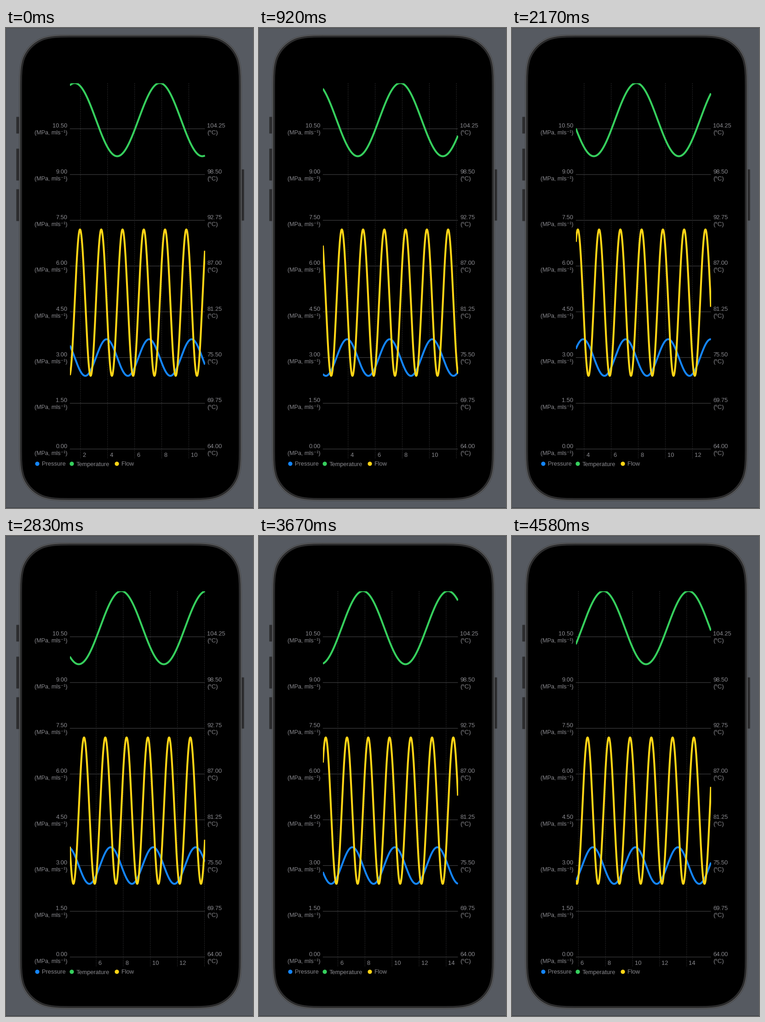
Write a matplotlib script that moves like this. It is 537 px wide and 1042 px high and loops after 4670 ms.

```python
import numpy as np
import matplotlib.pyplot as plt
from matplotlib.animation import FuncAnimation
from matplotlib.patches import Circle, PathPatch, Rectangle, FancyBboxPatch
from matplotlib.path import Path

W, H, DPI = 537, 1042, 64
PT = 72 / DPI                      # points per pixel
LOOP_MS = 4670
POSES, SUB = 56, 3                 # chart steps per loop, frames per step
FRAMES = POSES * SUB

# plot area in pixels
LEFT, RIGHT, TOP, BASE = 138.8, 432.5, 119.5, 914.0
PX_X, PX_Y = 29.43, 66.21          # pixels per unit
SPAN = (RIGHT - LEFT) / PX_X
START, STEP = 1.213, 0.0836        # first x shown, units per chart step

BLUE, GREEN, YELLOW = "#1485fb", "#36cf5d", "#ffd516"
LABEL = "#8b8b90"
FONT = ["Liberation Sans", "DejaVu Sans"]

# name, colour, middle, amplitude, frequency
SERIES = [
    ("Pressure", BLUE, 3.0, 0.6, 2),
    ("Temperature", GREEN, 10.8, 1.2, 1),
    ("Flow", YELLOW, 4.8, 2.4, 4),
]

fig = plt.figure(figsize=(W / DPI, H / DPI), dpi=DPI, facecolor="#565a61")
ax = fig.add_axes([0, 0, 1, 1])
ax.set_xlim(0, W)
ax.set_ylim(H, 0)
ax.axis("off")


def to_y(v):
    return BASE - PX_Y * v


def text(x, y, s, size=12.9, ha="left"):
    return ax.text(x, y, s, fontsize=size * PT, family=FONT, color=LABEL,
                   ha=ha, va="baseline", zorder=6)


def rect(x0, y0, x1, y1, color, z=1):
    ax.add_patch(Rectangle((x0, y0), x1 - x0, y1 - y0, fc=color, lw=0, zorder=z))


def smooth_rect(x0, y0, x1, y1, r, color, z):
    """Rounded rectangle whose corners ease into the sides."""
    corner = r * np.array([
        (0, 1.5287), (0, 1.0885), (0, 0.8684), (0.0749, 0.6315),
        (0.1691, 0.3728), (0.3728, 0.1691), (0.6315, 0.0749),
        (0.8684, 0), (1.0885, 0), (1.5287, 0)])
    flip = corner[::-1]
    parts = [
        corner + (x0, y0),
        flip * (-1, 1) + (x1, y0),
        corner * (-1, -1) + (x1, y1),
        flip * (1, -1) + (x0, y1),
    ]
    verts = np.vstack(parts + [parts[0][:1]])
    codes = ([Path.LINETO] + [Path.CURVE4] * 9) * 4 + [Path.CLOSEPOLY]
    codes[0] = Path.MOVETO
    ax.add_patch(PathPatch(Path(verts, codes), fc=color, lw=0, zorder=z))


def button(x0, y0, x1, y1):
    ax.add_patch(FancyBboxPatch(
        (x0 + 1, y0 + 1), x1 - x0 - 2, y1 - y0 - 2,
        boxstyle="round,pad=1,rounding_size=1", fc="#2c2c2e",
        ec="#3d3f42", lw=0.7 * PT, zorder=1))


def draw_phone():
    rect(0, 0, W, 1, "#4b4f55")
    rect(0, 0, 1, H, "#4f5359")
    rect(0, H - 1.5, W, H, "#3b3e42")
    for y0, y1 in [(193, 229), (262, 331), (350, 419)]:
        button(22.5, y0, 29, y1)
    button(511, 307, 517.5, 418)
    shells = [(0, "#3a3b3d"), (1, "#77787a"), (2, "#2b2b2c"), (6.5, "#000000")]
    for inset, color in shells:
        smooth_rect(28.3 + inset, 14 + inset, 512.7 - inset, 1027 - inset,
                    82 - inset, color, 2)


def draw_axes():
    for k in range(8):
        y = to_y(1.5 * k)
        ax.plot([LEFT, RIGHT], [y, y], color="#4b4b4d", lw=PT, snap=False,
                solid_capstyle="butt", zorder=3)
        text(133.5, y - 2.3, f"{1.5 * k:.2f}", ha="right")
        text(133.5, y + 12.6, "(MPa, mls⁻¹)", 12.6, ha="right")
        text(437, y - 2.3, f"{64 + 5.75 * k:.2f}")
        text(437, y + 12.6, "(°C)", 13.2)


def draw_legend():
    for (name, color, *_), x in zip(SERIES, [68, 143, 241]):
        ax.add_patch(Circle((x, 946), 4.6, fc=color, lw=0, zorder=6))
        text(x + 9.8, 950.5, name)


draw_phone()
draw_axes()
draw_legend()

ticks = []
for v in range(2, 16, 2):
    line, = ax.plot([], [], color="#343436", lw=PT, zorder=3, snap=False,
                    dashes=(2, 2), dash_capstyle="butt")
    ticks.append((v, line, text(0, 930.6, str(v))))

window = Rectangle((LEFT, TOP), RIGHT - LEFT, BASE - TOP,
                   transform=ax.transData)
curves = []
for i, (_, color, *_) in enumerate(SERIES):
    line, = ax.plot([], [], color=color, lw=4.1 * PT, zorder=4 + 0.1 * i,
                    solid_capstyle="butt", solid_joinstyle="round")
    line.set_clip_path(window)
    curves.append(line)

steps = np.linspace(0, SPAN, 600)


def update(n):
    # the chart jumps in steps, and the last step is held to the loop's end
    pose = min((n + 1) // SUB, POSES - 1)
    x0 = START + STEP * pose
    for line, (_, _, mid, amp, freq) in zip(curves, SERIES):
        line.set_data(LEFT + steps * PX_X,
                      to_y(mid + amp * np.sin(freq * (x0 + steps))))
    for v, line, label in ticks:
        px = LEFT + (v - x0) * PX_X
        line.set_data([px, px], [TOP + 0.5, 934])
        line.set_visible(LEFT <= px <= RIGHT)
        label.set_x(px + 4.5)
        label_end = px + 4.5 + 7.2 * len(str(v))
        label.set_visible(LEFT <= px and label_end <= RIGHT)
    return curves


anim = FuncAnimation(fig, update, frames=FRAMES, interval=LOOP_MS / FRAMES,
                     init_func=lambda: update(0), repeat=True, repeat_delay=0,
                     blit=False)
plt.show()
```
